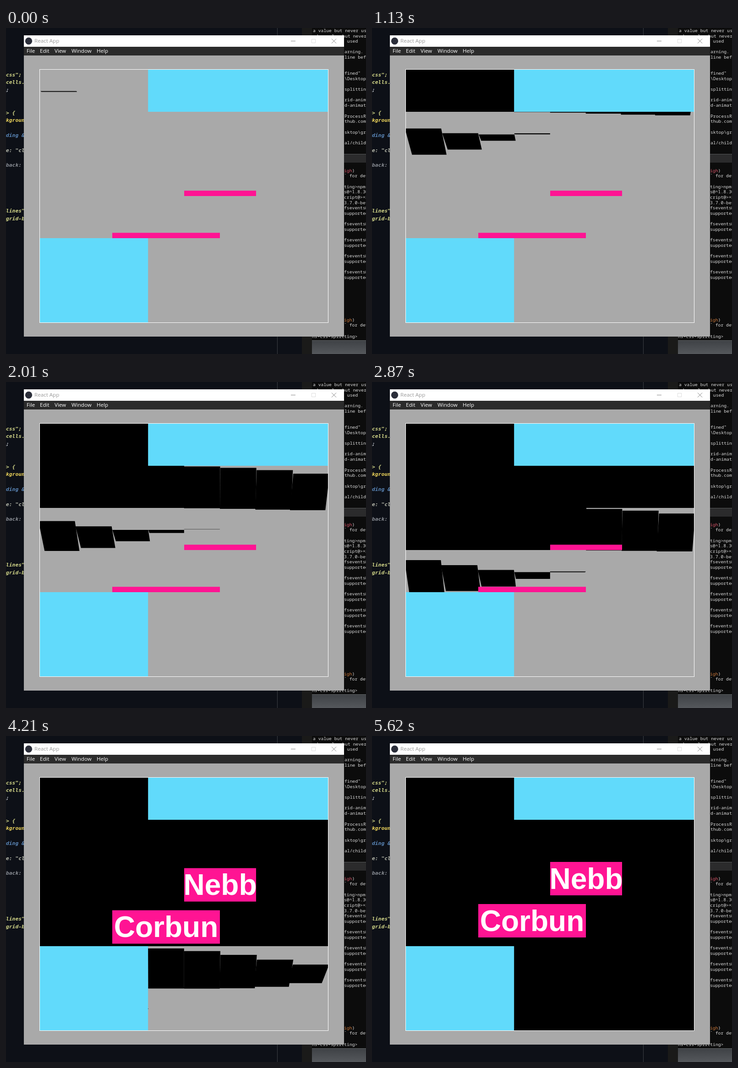
Write an HTML page with a canvas that moves like this. It is 786 px wide and 712 px high and loops after 6.78 s.

```html
<!DOCTYPE html>
<html lang="en">
<head>
<meta charset="utf-8">
<title>Grid animation</title>
<style>
  html, body { margin: 0; width: 100%; height: 100%; overflow: hidden; background: #0d1017; }
  canvas { display: block; }
</style>
</head>
<body>
<canvas id="stage" width="786" height="712"></canvas>
<script>
const W = 786, H = 712, LOOP = 6780;
const COLS = 8, ROWS = 6;
const MONO = '"Noto Sans Mono", monospace';
const UI = '"Open Sans", sans-serif';
const stage = document.getElementById('stage').getContext('2d');

const colX = c => 74.4 + 78.6 * c;
const rowY = r => 91 + 92 * r;

function box(g, color, x, y, w, h) {
  g.fillStyle = color;
  g.fillRect(x, y, w, h);
}

function label(g, text, x, y, color) {
  g.fillStyle = color;
  g.fillText(text, x, y);
}

// CSS "ease": cubic-bezier(.25, .1, .25, 1)
function ease(x) {
  if (x <= 0) return 0;
  if (x >= 1) return 1;
  const bez = (a, b, s) => 3 * a * s * (1 - s) ** 2 + 3 * b * s * s * (1 - s) + s ** 3;
  let lo = 0, hi = 1;
  for (let i = 0; i < 24; i++) {
    const mid = (lo + hi) / 2;
    if (bez(.25, .25, mid) < x) lo = mid; else hi = mid;
  }
  return bez(.1, 1, lo);
}

// ---- static desktop ----

function drawEditor(g) {
  box(g, '#0d1017', 0, 0, W, H);
  box(g, '#3b3e44', 592, 0, 1, H);
  box(g, '#1a1a19', 646, 0, 22, H);
  g.font = 'italic bold 11.3px "DejaVu Sans Mono", monospace';
  const lines = [
    ['css";', 103, '#d5d98a'], ['cells.', 119, '#d5d98a'], [';', 136, '#c9ccd2'],
    ['> {', 186, '#d5d98a'], ['kgroun', 202, '#f0d75c'], ['ding &', 235, '#5b87b8'],
    ['e: "cl', 268, '#b9bcae'], ['back:', 300, '#8b8f96'],
    ['lines"', 400, '#d5d98a'], ['grid-b', 417, '#d5d98a']
  ];
  for (const [text, y, color] of lines) label(g, text, 0, y, color);
}

function drawTerminals(g) {
  const ink = '#dcdcdc', line = 11.67;
  box(g, '#0c0c0c', 668, 0, 118, 275);
  box(g, '#55585a', 668, 275, 118, 1);
  box(g, '#2b2b2c', 668, 276, 118, 18);
  box(g, '#0c0c0c', 668, 294, 118, 388);
  box(g, '#64676a', 668, 682, 118, 1);
  const bar = g.createLinearGradient(0, 683, 0, H);
  bar.addColorStop(0, '#3f4246');
  bar.addColorStop(1, '#55585c');
  box(g, bar, 668, 683, 118, 29);

  g.font = '9.75px ' + MONO;
  label(g, 'a value but never us', 670, 6, ink);
  label(g, 'ed a value but never', 670, 18, ink);
  const upper = [
    [2, ' used'], [4, 'arning.'], [5, 'line bef'], [8, 'fined"'], [9, '\\Desktop'],
    [11, 'splitting'], [13, 'rid-anim'], [14, 'd-animat'], [16, 'ProcessRe'],
    [17, 'thub.com'], [19, 'sktop\\gr'], [21, 'al/child']
  ];
  for (const [i, text] of upper) label(g, text, 739, 6 + line * i, ink);

  const audit = (y, color) => {
    label(g, 'igh', 738, y, color);
    label(g, ')', 755.5, y, ink);
    label(g, '` for det', 738, y + line, ink);
  };
  audit(312, '#d9576b');
  audit(638, '#cf7a3c');
  ['ting>npm', 's@^1.8.30', 'cript@>=2', '3.7.0-bet'].forEach((text, i) =>
    label(g, text, 738, 347 + line * i, ink));
  for (let i = 0; i < 5; i++) {
    label(g, 'fsevents@', 738, 393.5 + 35 * i, ink);
    label(g, 'supported', 738, 405.2 + 35 * i, ink);
  }
  label(g, 'ns-css-splitting>', 668, 674, ink);
}

function drawWindow(g) {
  box(g, '#a9a9a9', 39, 16, 699, 658);
  box(g, '#ffffff', 39, 16, 699, 25);
  box(g, '#2b2b2b', 39, 41, 699, 19);
  g.fillStyle = '#2b2e3a';
  g.beginPath();
  g.arc(49.5, 28.5, 7.7, 0, 7);
  g.fill();

  g.font = '11.6px ' + UI;
  label(g, 'React App', 62, 28.5, '#999999');
  const menu = [['File', 45], ['Edit', 74], ['View', 106], ['Window', 143], ['Help', 198]];
  for (const [text, x] of menu) label(g, text, x, 50.5, '#ffffff');

  g.lineWidth = 1;
  box(g, '#888888', 622, 28, 10, 1);
  g.strokeStyle = '#dddddd';
  g.strokeRect(667.5, 24.5, 8, 8);
  g.strokeStyle = '#808080';
  g.beginPath();
  g.moveTo(711, 23.5); g.lineTo(721, 33.5);
  g.moveTo(721, 23.5); g.lineTo(711, 33.5);
  g.stroke();

  g.strokeStyle = '#ffffff';
  g.strokeRect(73.5, 90.5, 630, 553);
}

const desktop = document.createElement('canvas');
desktop.width = W;
desktop.height = H;
const back = desktop.getContext('2d');
back.textBaseline = 'middle';
drawEditor(back);
drawTerminals(back);
drawWindow(back);

// ---- timing ----

const CELL_DELAY = 100, CELL_TIME = 1000, LEAD = 59;
const NAME_START = 3680, NAME_TIME = 1000;

// Bursts of evenly held steps: start, end, count
const BURSTS = [
  [40, 710, 16], [760, 1400, 15], [1440, 2090, 15], [2140, 2810, 15],
  [2870, 3510, 15], [3550, 4210, 15], [4270, 4920, 15], [4960, 5620, 15]
];

function hold(t) {
  let held = 0;
  for (const [start, end, count] of BURSTS) {
    if (t < start) break;
    const step = (end - start) / (count - 1);
    held = start + step * Math.min(count - 1, Math.floor((t - start) / step + .1));
  }
  return held;
}

// ---- moving parts ----

const DEPTH = 600, EYE_X = colX(4), EYE_Y = rowY(3);

// Each cell eases from rotateX(-90deg) scaleY(0) translateY(100%) to rest
function drawCell(g, index, t) {
  const e = ease((t + LEAD - index * CELL_DELAY) / CELL_TIME);
  if (e === 0) return;
  const c = index % COLS, r = Math.floor(index / COLS);
  const left = colX(c), right = colX(c + 1), top = rowY(r), height = rowY(1) - rowY(0);
  if (e > .997) {
    const x = Math.floor(left);
    box(g, '#000', x, top, Math.ceil(right) - x, height);
    return;
  }
  const mid = top + height / 2;
  const angle = (1 - e) * Math.PI / 2;
  const edge = side => {
    const y = e * height * (side + 1 - e);
    const scale = DEPTH / (DEPTH + y * Math.sin(angle));
    return {
      x0: EYE_X + (left - EYE_X) * scale,
      x1: EYE_X + (right - EYE_X) * scale,
      y: EYE_Y + (mid + y * Math.cos(angle) - EYE_Y) * scale
    };
  };
  const a = edge(-.5), b = edge(.5);
  g.fillStyle = '#000';
  g.beginPath();
  g.moveTo(a.x0, a.y);
  g.lineTo(a.x1, a.y);
  g.lineTo(b.x1, b.y);
  g.lineTo(b.x0, b.y);
  g.fill();
}

function drawName(g, text, c, r, span, shift) {
  const x = Math.round(colX(c)), w = Math.round(colX(c + span)) - x, y = rowY(r);
  g.save();
  g.beginPath();
  g.rect(x, y, w, rowY(r + 1) - y);
  g.clip();
  box(g, '#ff1493', x, y + shift, w, 73);
  g.font = 'bold 64px "Liberation Sans", Arial, sans-serif';
  g.textAlign = 'center';
  label(g, text, x + w / 2, y + 58.5 + shift, '#fff');
  g.restore();
}

function draw(t) {
  const g = stage;
  g.drawImage(desktop, 0, 0);
  g.save();
  g.beginPath();
  g.rect(74, 91, 629, 552);
  g.clip();
  for (let i = 0; i < COLS * ROWS; i++) drawCell(g, i, t);
  box(g, '#61dafb', colX(3), rowY(0), colX(5), rowY(1) - rowY(0));
  box(g, '#61dafb', 74, rowY(4), colX(3) - 74, rowY(6) - rowY(4));
  const shift = 80.3 * (1 - ease((t - NAME_START) / NAME_TIME));
  drawName(g, 'Nebb', 4, 2, 2, shift);
  drawName(g, 'Corbun', 2, 3, 3, shift);
  g.restore();
}

const begin = performance.now();
function tick() {
  draw(hold((performance.now() - begin) % LOOP));
  requestAnimationFrame(tick);
}
tick();
</script>
</body>
</html>
```
